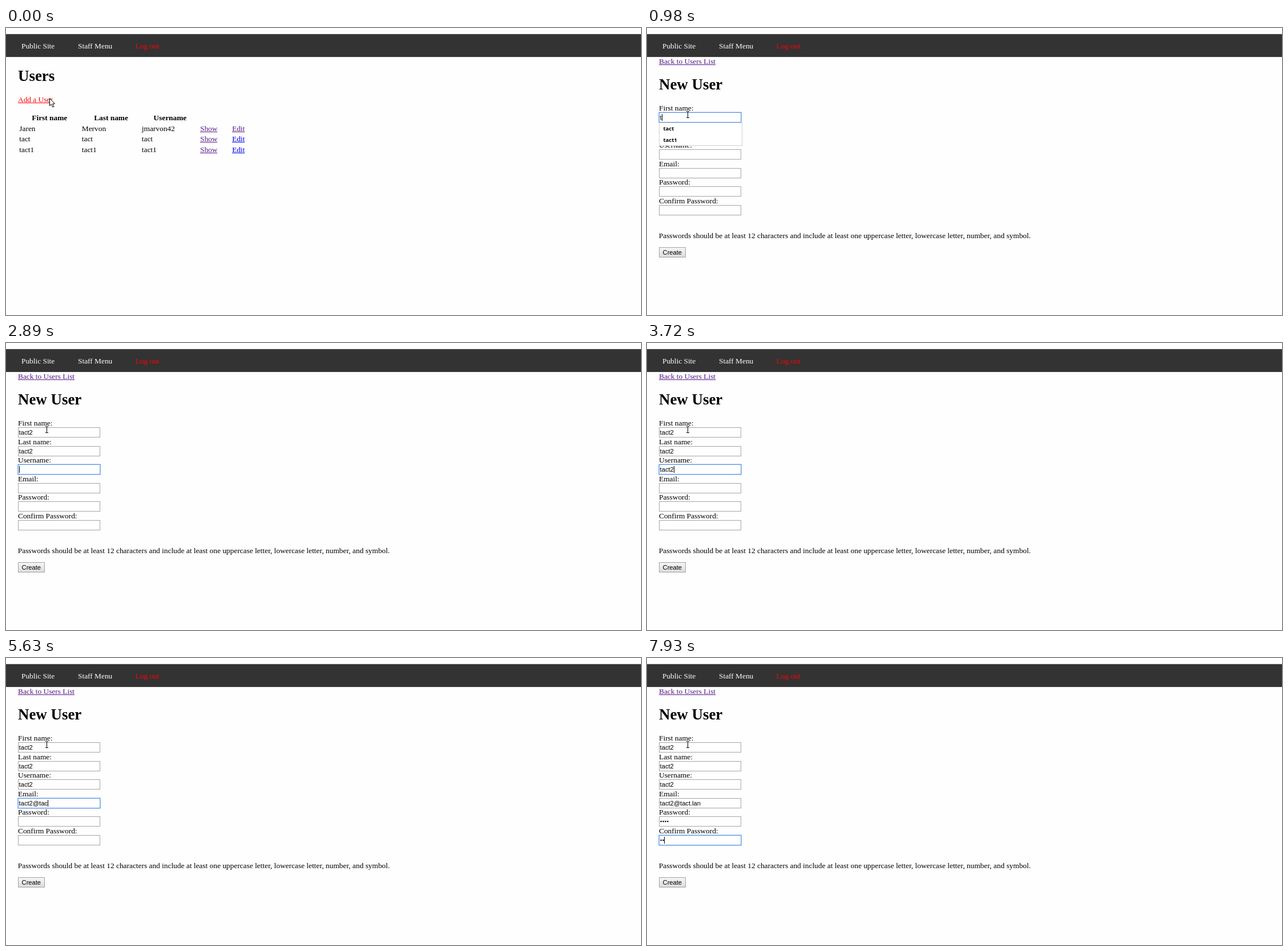
Write an HTML page with a canvas that moves like this. It is 1112 by 504 pixels and loops after 8 s.

```html
<!DOCTYPE html>
<html lang="en">
<head>
<meta charset="utf-8">
<title>New User form</title>
<style>
html, body { margin: 0; width: 100%; height: 100%; overflow: hidden; background: #fefefe; }
canvas { display: block; }
</style>
</head>
<body>
<canvas id="stage" width="1112" height="504"></canvas>
<script>
const ctx = document.getElementById('stage').getContext('2d', { alpha: false });

const LOOP = 8000;
const SERIF = '"Liberation Serif", "Times New Roman", serif';
const SANS = '"Liberation Sans", Arial, sans-serif';
const BODY = `13.36px ${SERIF}`;
const BOLD = `bold 13.36px ${SERIF}`;
const HEADING = `bold 26.9px ${SERIF}`;
const INPUT = `11.15px ${SANS}`;
const HINT = 'bold 9.5px "Open Sans", sans-serif';
const BG = '#fefefe', RED = '#ff0000', BLUE = '#0000ee', VISITED = '#551a8b';

const fields = [
  { label: 'First name:', value: 'tact2', hints: ['tact', 'tact1'] },
  { label: 'Last name:', value: 'tact2', hints: ['tact', 'tact1'] },
  { label: 'Username:', value: 'tact2', hints: ['tact', 'tact1'] },
  { label: 'Email:', value: 'tact2@tact.lan', hints: ['tact'] },
  { label: 'Password:', value: '••••', hints: [], secret: true },
  { label: 'Confirm Password:', value: '••••', hints: [], secret: true }
];

const users = [
  ['Jaren', 'Mervon', 'jmarvon42', VISITED],
  ['tact', 'tact', 'tact', BLUE],
  ['tact1', 'tact1', 'tact1', BLUE]
];

// [time, focused field, characters typed]
const typing = [[840, 0, 0]];
function type(field, count, ...times) {
  times.forEach((time, i) => typing.push([time, field, count + i]));
}
type(0, 1, 980, 1130, 1280, 1430, 1710);
type(1, 0, 1960, 2080, 2215, 2350, 2485, 2750);
type(2, 0, 2890, 3170);
type(2, 3, 3305, 3440, 3720);
type(3, 0, 3840, 4390, 4520, 4650, 4780);
type(3, 5, 5060, 5193, 5326, 5459, 5592, 5725, 5858, 5990, 6110, 6245);
type(4, 0, 6380, 6910, 7050, 7190, 7330);
type(5, 0, 7610, 7790, 7930);

// [time, shape, x, y]
const pointer = [
  [0, arrow, 76, 123],
  [430, arrow, 74, 129],
  [570, beam, 72, 149],
  [710, beam, 71, 152]
];

const latest = (steps, time) => steps.filter(step => step[0] <= time).pop();

function rect(x, y, w, h, color) {
  ctx.fillStyle = color;
  ctx.fillRect(x, y, w, h);
}

function frame(x, y, w, h, color, width = 1) {
  ctx.strokeStyle = color;
  ctx.lineWidth = width;
  ctx.strokeRect(x + 0.5, y + 0.5, w - 1, h - 1);
}

function text(str, x, y, font = BODY, color = '#000', align = 'left') {
  ctx.font = font;
  ctx.fillStyle = color;
  ctx.textAlign = align;
  ctx.fillText(str, x, y);
}

function link(str, x, y, color) {
  text(str, x, y, BODY, color);
  rect(x, Math.round(y) + 1, Math.round(ctx.measureText(str).width), 1, color);
}

function arrow(x, y) {
  ctx.beginPath();
  [[0, 0], [0, 13], [3, 10.3], [5.3, 15.4], [7.5, 14.4], [5.2, 9.5], [9, 9.5]]
    .forEach(([dx, dy]) => ctx.lineTo(x + dx + 0.5, y + dy + 0.5));
  ctx.closePath();
  ctx.fillStyle = '#fff';
  ctx.fill();
  ctx.strokeStyle = '#000';
  ctx.lineWidth = 1;
  ctx.stroke();
}

function beam(x, y) {
  rect(x, y - 5, 1, 11, '#000');
  for (const end of [y - 6, y + 5]) {
    rect(x - 2, end, 2, 1, '#000');
    rect(x + 1, end, 2, 1, '#000');
  }
}

function drawNav() {
  rect(0, 10.7, 1112, 40.2, '#333');
  text('Public Site', 27, 36, BODY, '#fff');
  text('Staff Menu', 126, 36, BODY, '#fff');
  text('Log out', 226.5, 36, BODY, RED);
}

function drawList() {
  text('Users', 21, 93, HEADING);
  link('Add a User', 21, 130, RED);
  text('First name', 76.3, 162, BOLD, '#000', 'center');
  text('Last name', 184, 162, BOLD, '#000', 'center');
  text('Username', 287.3, 162, BOLD, '#000', 'center');
  users.forEach(([first, last, name, editColor], i) => {
    const y = Math.round(181 + i * 18.4);
    text(first, 23.3, y);
    text(last, 132.8, y);
    text(name, 237.8, y);
    link('Show', 340, y, VISITED);
    link('Edit', 396, y, editColor);
  });
}

const inputTop = i => Math.round(148 + i * 32.55);

function drawDots(count, x, y) {
  ctx.fillStyle = '#000';
  for (let i = 0; i < count; i++) {
    ctx.beginPath();
    ctx.arc(x + i * 3.9, y, 1.3, 0, Math.PI * 2);
    ctx.fill();
  }
}

function drawField(field, i, value, focused) {
  const y = inputTop(i);
  text(field.label, 21, y - 3);
  rect(21, y, 144, 18, '#fff');
  if (focused) frame(20.6, y - 0.2, 144.8, 18.4, '#5a94ec', 1.4);
  else frame(21, y, 144, 18, '#a6a6a6');

  if (field.secret) drawDots(value.length, 24.6, y + 9);
  else text(value, 22.6, y + 12.6, INPUT);

  if (focused) {
    ctx.font = INPUT;
    rect(Math.round(22.6 + ctx.measureText(value).width), y + 3, 1, 12, '#000');
  }
}

function drawHints(i, value) {
  const hints = fields[i].hints.filter(hint => value && hint.startsWith(value));
  if (!hints.length) return;
  const y = inputTop(i) + 18;
  const h = hints.length * 20 + 1;
  rect(21, y, 146, h, '#fff');
  frame(21, y, 146, h, '#d0d0d0');
  hints.forEach((hint, row) => text(hint, 28.5, y + 13.6 + row * 20, HINT));
}

function drawButton() {
  const shade = ctx.createLinearGradient(0, 386, 0, 402);
  shade.addColorStop(0, '#f6f6f6');
  shade.addColorStop(1, '#dcdcdc');
  rect(21, 385, 47, 18, shade);
  frame(21, 385, 47, 18, '#a3a3a3');
  text('Create', 44.3, 398, INPUT, '#000', 'center');
}

function drawForm(time) {
  const [, active, count] = latest(typing, time) || [0, -1, 0];
  link('Back to Users List', 21, 63, VISITED);
  text('New User', 21, 108, HEADING);
  fields.forEach((field, i) => {
    const typed = i < active ? field.value : i === active ? field.value.slice(0, count) : '';
    drawField(field, i, typed, i === active);
  });
  if (active >= 0) drawHints(active, fields[active].value.slice(0, count));
  text('Passwords should be at least 12 characters and include at least one uppercase letter, ' +
    'lowercase letter, number, and symbol.', 20.8, 369);
  drawButton();
}

function draw(now) {
  const time = now % LOOP;
  rect(0, 0, 1112, 504, BG);
  drawNav();
  if (time < 150) drawList();
  else drawForm(time);
  const [, shape, x, y] = latest(pointer, time);
  shape(x, y);
  requestAnimationFrame(draw);
}

draw(0);
</script>
</body>
</html>
```
